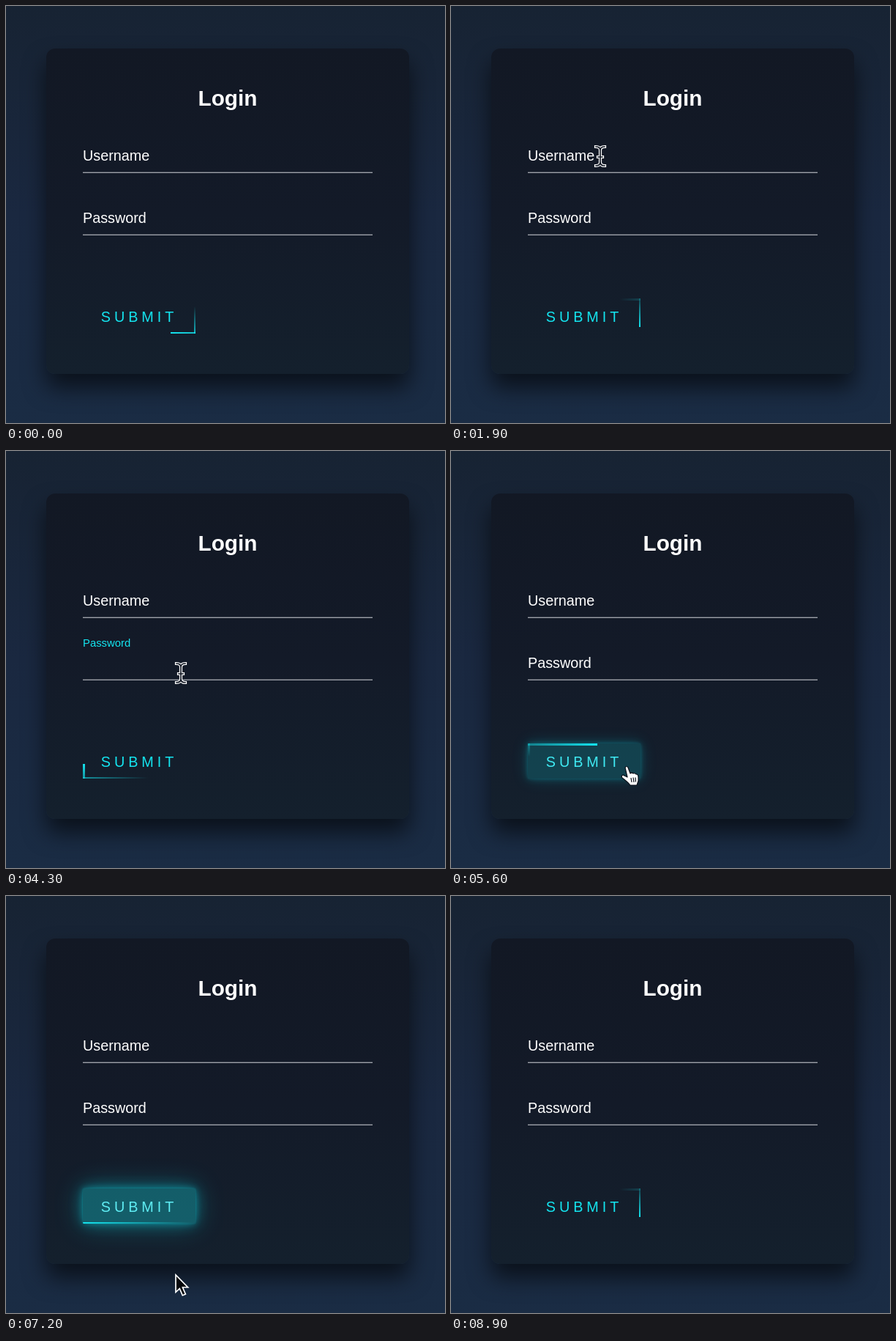
Recreate the animation shown at these times as an HTML page. Size 600 px wide and 569 px high, loop 9 s.

```html
<!DOCTYPE html>
<html lang="en">
<head>
<meta charset="utf-8">
<title>Login</title>
<style>
  :root { --cyan: #14e4ef; --loop: 9s; }
  html, body { margin: 0; width: 100%; height: 100%; overflow: hidden; }
  body {
    position: relative;
    background: linear-gradient(#172333, #1a2840 50%, #1a2c44);
    font: 19.8px/0 "Liberation Sans", Arial, sans-serif;
    color: #fff;
  }
  body *, svg { position: absolute; }
  .card {
    left: 55px; top: 58px; width: 496px; height: 444px;
    border-radius: 12px;
    background: linear-gradient(#121824, #131a28 50%, #14202d);
    box-shadow: 0 18.5px 31px rgba(0, 0, 0, .6);
  }
  h2 {
    left: 55px; top: 125.7px; width: 496px; margin: 0;
    font-size: 29.7px; text-align: center;
  }

  /* Fields */
  .field { left: 105px; width: 396px; height: 40px; }
  .user { top: 188px; }
  .pass { top: 273px; }
  .field::after {
    content: ""; position: absolute; left: 0; top: 39px; width: 100%; height: 1px;
    background: #9ca0a8; box-shadow: 0 -1px #4a505b;
  }
  label { left: 0; top: 16.2px; white-space: nowrap; }
  .caret { left: 0; top: 5px; width: 1.5px; height: 22px; background: #fff; opacity: 0; }
  .user label { animation: user-label var(--loop) infinite; }
  .pass label { animation: pass-label var(--loop) infinite; }
  .user .caret { animation: user-caret var(--loop) step-end infinite; }
  .pass .caret { animation: pass-caret var(--loop) step-end infinite; }

  @keyframes user-label {
    0%, 28.33%, 45%, 100% { top: 16.2px; font-size: 19.8px; color: #fff; }
    33.89%, 39.44% { top: -11.2px; font-size: 14.85px; color: var(--cyan); }
  }
  @keyframes pass-label {
    0%, 39.44%, 56.67%, 100% { top: 16.2px; font-size: 19.8px; color: #fff; }
    45%, 51.11% { top: -11.2px; font-size: 14.85px; color: var(--cyan); }
  }
  @keyframes user-caret { 0%, 33.9% { opacity: 0; } 28.3% { opacity: 1; } }
  @keyframes pass-caret { 0%, 45%, 51.1% { opacity: 0; } 39.4%, 50.5% { opacity: 1; } }

  /* Button */
  .submit {
    left: 105px; top: 399px; width: 154px; height: 48px;
    overflow: hidden; color: var(--cyan); letter-spacing: 4.95px;
    animation: hover var(--loop) infinite;
  }
  .submit b { left: 24.8px; top: 25.2px; font-weight: normal; }
  @keyframes hover {
    0%, 61.4%, 83.33%, 100% {
      background: rgba(20, 228, 239, 0); color: var(--cyan); border-radius: 0;
      box-shadow: 0 0 0 rgba(20, 228, 239, 0), 0 0 0 rgba(20, 228, 239, 0),
        0 0 0 rgba(20, 228, 239, 0), 0 0 0 rgba(20, 228, 239, 0);
    }
    66.96%, 77.78% {
      background: var(--cyan); color: #fff; border-radius: 6px;
      box-shadow: 0 0 6px var(--cyan), 0 0 31px var(--cyan),
        0 0 62px var(--cyan), 0 0 124px var(--cyan);
    }
  }
  .submit i { animation: 1s linear infinite; }
  .submit i:nth-of-type(odd) { width: 100%; height: 2.5px; }
  .submit i:nth-of-type(even) { width: 2.5px; height: 100%; }
  .n { top: 0; background: linear-gradient(90deg, transparent, var(--cyan)); }
  .e { right: 0; background: linear-gradient(180deg, transparent, var(--cyan)); }
  .s { bottom: 0; background: linear-gradient(270deg, transparent, var(--cyan)); }
  .w { left: 0; background: linear-gradient(0deg, transparent, var(--cyan)); }
  .submit .n { animation-name: run-n; animation-delay: -1.555s; }
  .submit .e { animation-name: run-e; animation-delay: -1.305s; }
  .submit .s { animation-name: run-s; animation-delay: -1.055s; }
  .submit .w { animation-name: run-w; animation-delay: -.805s; }
  @keyframes run-n { 0% { left: -100%; } 50%, 100% { left: 100%; } }
  @keyframes run-e { 0% { top: -100%; } 50%, 100% { top: 100%; } }
  @keyframes run-s { 0% { right: -100%; } 50%, 100% { right: 100%; } }
  @keyframes run-w { 0% { bottom: -100%; } 50%, 100% { bottom: 100%; } }

  /* Pointer */
  .pointer { left: 0; top: 0; width: 1px; height: 1px; overflow: visible; animation: move var(--loop) linear infinite; }
  .pointer g { opacity: 0; animation: var(--loop) step-end infinite; }
  .pointer .arrow { animation-name: arrow; }
  .pointer .beam { animation-name: beam; }
  .pointer .hand { animation-name: hand; }
  @keyframes move {
    0%, 15.56% { transform: translate(400px, 131px); }
    17.78% { transform: translate(310px, 165px); }
    20% { transform: translate(206px, 203px); }
    21.11% { transform: translate(204px, 205px); }
    25.56% { transform: translate(210px, 208px); }
    28.33% { transform: translate(238px, 212px); }
    32.22% { transform: translate(239px, 218px); }
    33.33% { transform: translate(239px, 229px); }
    37.78% { transform: translate(239px, 290px); }
    40%, 47.78% { transform: translate(239px, 303px); }
    50% { transform: translate(300px, 262px); }
    51.11% { transform: translate(350px, 240px); }
    52.22% { transform: translate(410px, 216px); }
    54.44% { transform: translate(417px, 255px); }
    55.56% { transform: translate(418px, 294px); }
    56.67% { transform: translate(400px, 320px); }
    58.89% { transform: translate(330px, 370px); }
    61.11% { transform: translate(243px, 430px); }
    62.22%, 76.67% { transform: translate(238px, 431px); }
    77.78% { transform: translate(233px, 465px); }
    80% { transform: translate(231px, 516px); }
    82.22%, 100% { transform: translate(229px, 574px); }
  }
  @keyframes arrow {
    0%, 18.8%, 36.6%, 52.2%, 55.5%, 61.1%, 82% { opacity: 0; }
    15.5%, 34.4%, 48.8%, 53.3%, 56.6%, 77.7% { opacity: 1; }
  }
  @keyframes beam {
    0%, 34.4%, 48.8%, 53.3%, 56.6% { opacity: 0; }
    18.8%, 36.6%, 52.2%, 55.5% { opacity: 1; }
  }
  @keyframes hand { 0%, 77.7% { opacity: 0; } 61.1% { opacity: 1; } }
</style>
</head>
<body>
  <div class="card"></div>
  <h2>Login</h2>
  <div class="field user"><label>Username</label><div class="caret"></div></div>
  <div class="field pass"><label>Password</label><div class="caret"></div></div>
  <div class="submit">
    <i class="n"></i><i class="e"></i><i class="s"></i><i class="w"></i>
    <b>SUBMIT</b>
  </div>
  <svg class="pointer">
    <defs>
      <path id="bar" d="M-6-13Q0-13 0-8Q0-13 6-13M0-9V9M-6 13Q0 13 0 8Q0 13 6 13M-3 1H3"/>
    </defs>
    <g class="arrow">
      <path d="M1 1V24.5L6.3 19.6L10.3 29L14.4 27.2L10.4 18H17.6Z" fill="#05070b" stroke="#fff" stroke-width="1.7"/>
    </g>
    <g class="beam" fill="none" stroke-linecap="square">
      <use href="#bar" stroke="#fff" stroke-width="4.2"/>
      <use href="#bar" stroke="#121824" stroke-width="1.7"/>
    </g>
    <g class="hand" stroke="#0a0f18" stroke-width="1.2" stroke-linejoin="round">
      <path fill="#fff" d="M0 1C1-1 3-1 4 1L7 9C9 7 10 8 11 9C13 8 14 9 15 10C17 10 18 12 18 14V19L16 25H7C4 21 0 18-4 15C-6 12-3 10-1 12L3 14Z"/>
      <path fill="none" d="M8 15L9 21M11 14.500L12 21M14 14.500L14.500 20.500"/>
    </g>
  </svg>
<script>
  // The picture advances ten times a second.
  const STEP = 100, LOOP = 9000;
  const parts = document.getAnimations();
  parts.forEach(part => part.pause());

  function draw() {
    const time = Math.floor(performance.now() / STEP) * STEP % LOOP;
    parts.forEach(part => { part.currentTime = time; });
    requestAnimationFrame(draw);
  }
  draw();
</script>
</body>
</html>
```
